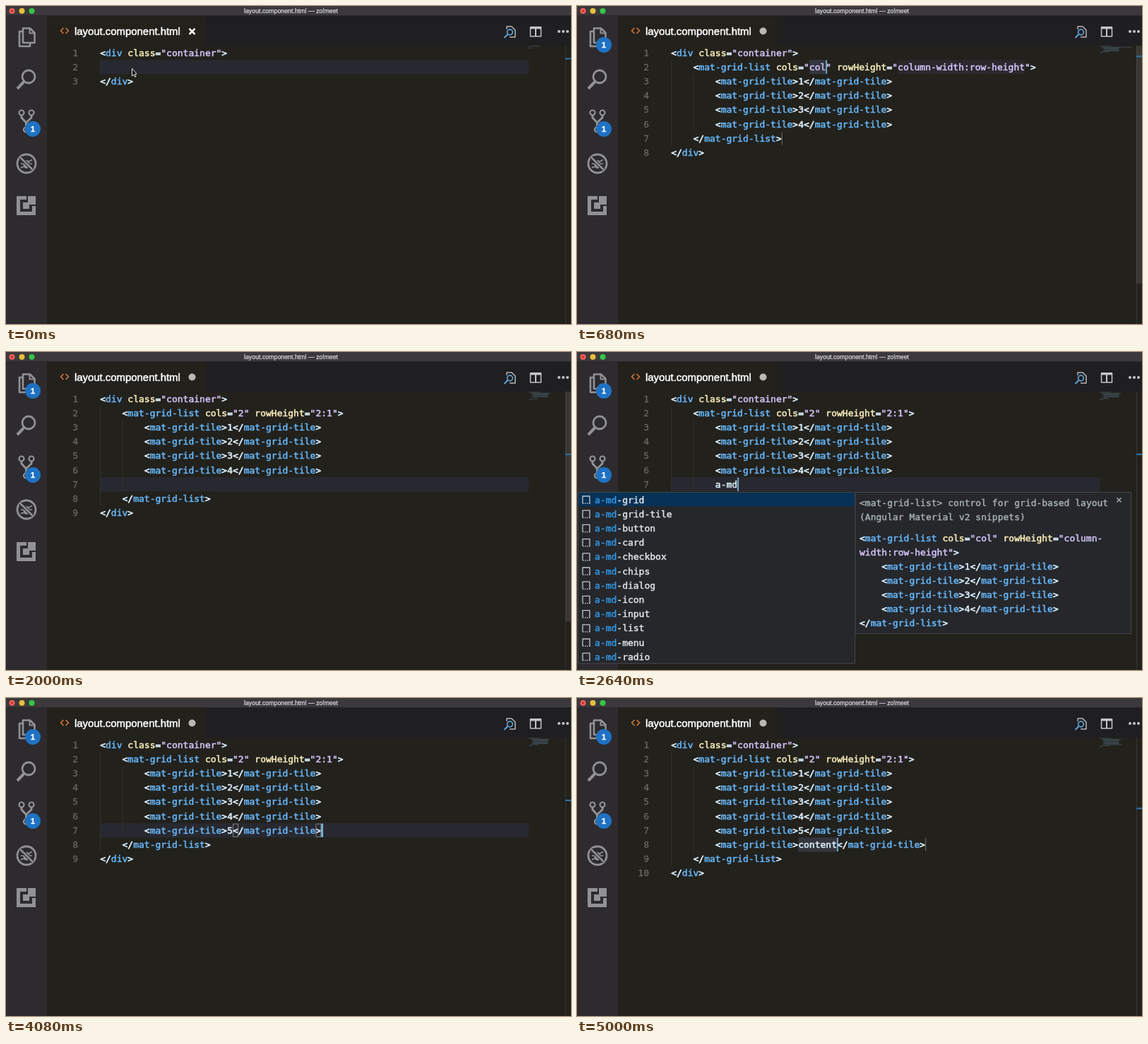
An HTML page with a canvas for the animation above (5040 ms loop, 800 by 450 pixels).

```html
<!DOCTYPE html>
<html lang="en">
<head>
<meta charset="utf-8">
<title>Grid snippet</title>
<style>
html, body { margin: 0; width: 100%; height: 100%; overflow: hidden; background: #22211c; }
canvas { display: block; width: 800px; height: 450px; }
</style>
</head>
<body>
<canvas id="stage" width="800" height="450"></canvas>
<script>
const ctx = document.getElementById('stage').getContext('2d');
const LOOP = 5040, LEFT = 133.2, TOP = 56, ROW = 20.2, CHAR = 7.826;
const MONO = '13px "DejaVu Sans Mono", monospace';
const SANS = '"Liberation Sans", Arial, sans-serif';
const ICON = '#929194', SIDE = '#2d2b2e';
const color = { tag: '#66b4f5', attr: '#f3e7b5', string: '#cfbff3', plain: '#dceefb' };

const OPEN = '<div class="container">', CLOSE = '</div>';
const LIST_END = '    </mat-grid-list>';
const tile = text => `        <mat-grid-tile>${text}</mat-grid-tile>`;
const tiles = [1, 2, 3, 4].map(tile);
const list = (cols, height) => `    <mat-grid-list cols="${cols}" rowHeight="${height}">`;
const QUERY = 'a-md-grid';
const PAUSED_KEYS = [2160, 2360, 2480, 2640, 2840, 2960, 3040, 3120, 3200];
const snippets = ['grid', 'grid-tile', 'button', 'card', 'checkbox', 'chips', 'dialog',
  'icon', 'input', 'list', 'menu', 'radio'].map(name => 'a-md-' + name);

const typed = (t, start, step) =>
  t < start ? '' : QUERY.slice(0, 1 + Math.floor((t - start) / step));
const x = col => LEFT + col * CHAR;
const y = row => TOP + (row - 1) * ROW;

function rect(left, top, w, h, fill) {
  ctx.fillStyle = fill;
  ctx.fillRect(left, top, w, h);
}

function path(points, stroke, width = 2, closed = false) {
  ctx.beginPath();
  points.forEach(([px, py]) => ctx.lineTo(px, py));
  if (closed) ctx.closePath();
  ctx.strokeStyle = stroke;
  ctx.lineWidth = width;
  ctx.stroke();
}

function circle(cx, cy, r, fill, stroke, width = 2) {
  ctx.beginPath();
  ctx.arc(cx, cy, r, 0, Math.PI * 2);
  if (fill) { ctx.fillStyle = fill; ctx.fill(); }
  if (stroke) { ctx.strokeStyle = stroke; ctx.lineWidth = width; ctx.stroke(); }
}

function label(text, px, py, fill, font, align = 'left', weight = 0.25) {
  ctx.font = font;
  ctx.textAlign = align;
  ctx.fillStyle = ctx.strokeStyle = fill;
  ctx.lineWidth = weight;
  ctx.fillText(text, px, py);
  ctx.strokeText(text, px, py);
}

const mono = (text, px, center, fill, align, weight = 0.3) =>
  label(text, px, center + 4.6, fill, MONO, align, weight);

// Highlights markup; strings may continue over a line break.
function code(text, left, center, pitch) {
  let col = 0, row = 0, previous = '';
  for (const match of text.matchAll(/"[^"]*"|<\/?|[\w-]+|\s|[^\w\s]/g)) {
    const token = match[0];
    let kind = 'plain';
    if (token[0] === '"') kind = 'string';
    else if (previous[0] === '<') kind = 'tag';
    else if (text[match.index + token.length] === '=') kind = 'attr';
    token.split('\n').forEach((part, i) => {
      if (i) { row++; col = 0; }
      if (part.trim()) mono(part, left + col * CHAR, center + row * pitch, color[kind], 'left', 0.6);
      col += part.length;
    });
    previous = token;
  }
}

function sceneAt(t) {
  if (t < 600) {
    const query = typed(t, 120, 50);
    return { lines: [OPEN, '    ' + query, CLOSE], row: 2, query, caret: query && 4 + query.length };
  }
  if (t < 1880) {
    const second = t >= 1040;
    const cols = t < 880 ? 'col' : '2';
    const ratio = t < 1200 ? 'column-width:row-height' : '2:1'.slice(0, 1 + Math.floor((t - 1200) / 80));
    const scene = { lines: [OPEN, list(cols, ratio), ...tiles, LIST_END, CLOSE], row: 2 };
    if (t >= 1720) return { ...scene, row: 6, caret: 40 };
    if (t >= 1560) return { ...scene, row: 7, caret: 20 };
    const first = 25, next = first + cols.length + 13;
    scene.end = [7, 20];
    scene.caret = second ? next + ratio.length : first + cols.length;
    if (t < 1200) scene.soft = [2, next, ratio.length];
    if (t < 880) scene.select = [2, first, 3];
    else if (second && t < 1200) scene.select = scene.soft;
    return scene;
  }
  const second = t >= 4240;
  const row = second ? 8 : 7;
  const before = [OPEN, list('2', '2:1'), ...tiles];
  if (second) before.push(tile(5));
  const scene = { row };
  let line = '';
  if (t >= (second ? 4960 : 3640)) {
    const text = !second && t >= 3840 ? '5' : 'content';
    line = tile(text);
    scene.caret = 23 + text.length;
    if (!second && t >= 3960) {
      scene.brackets = [24, 39];
      scene.caret = 40;
    } else scene.end = [row, line.length];
    if (text === 'content') scene.select = [row, 23, 7];
  } else {
    scene.query = second ? typed(t, 4520, 35) : QUERY.slice(0, PAUSED_KEYS.filter(k => t >= k).length);
    scene.pick = t >= (second ? 4880 : 3440) ? 1 : 0;
    line = '        ' + scene.query;
    if (scene.query) scene.caret = line.length;
  }
  scene.lines = [...before, line, LIST_END, CLOSE];
  return scene;
}

function drawBadge(cy) {
  circle(38, cy, 11, '#1f72c3');
  label('1', 38, cy + 4.2, '#fff', 'bold 11.5px ' + SANS, 'center');
}

function drawSidebar(dirty) {
  rect(0, 14, 58, 436, SIDE);
  path([[23, 36], [19, 36], [19, 57], [34, 57], [34, 53]], ICON, 2.6);
  path([[24, 31.5], [34, 31.5], [40.5, 38], [40.5, 52], [24, 52]], ICON, 2.6, true);
  path([[33.5, 32], [33.5, 38.5], [40, 38.5]], ICON);
  if (dirty) drawBadge(55);

  circle(32, 100, 9, null, ICON, 2.8);
  path([[25.5, 107], [16, 117]], ICON, 4);

  path([[22, 154], [22, 158], [28.5, 165], [28.5, 173]], ICON, 3);
  path([[36, 154], [36, 158], [28.5, 165]], ICON, 3);
  for (const [cx, cy] of [[22, 151], [36, 151], [28.5, 175]]) circle(cx, cy, 3.5, SIDE, ICON, 2.2);
  drawBadge(174);

  circle(29, 223, 13, null, ICON, 2.8);
  ctx.beginPath();
  ctx.ellipse(29, 224, 4.5, 6, 0, 0, Math.PI * 2);
  ctx.fillStyle = ICON;
  ctx.fill();
  for (const dy of [-4, 0, 4]) path([[21, 223 + dy * 1.4], [29, 224 + dy / 2], [37, 223 + dy * 1.4]], ICON, 1.7);
  path([[20, 214], [38, 232]], SIDE, 5);
  path([[20, 214], [38, 232]], ICON, 2.5);

  rect(15, 269, 27, 27, ICON);
  rect(20, 274, 17, 17, SIDE);
  rect(24, 278, 9, 9, ICON);
  rect(29, 269, 2, 6, SIDE);
  rect(36, 281, 6, 2, SIDE);
  rect(31, 274, 6, 7, ICON);
}

function drawHeader(dirty) {
  rect(0, 0, 800, 14, '#3b393c');
  rect(0, 13.5, 800, 1, '#1c1b1d');
  ['#fc5b57', '#e5bf3c', '#34c748'].forEach((fill, i) => circle(8.5 + i * 14, 7, 4, fill));
  circle(8.5, 7, 1.1, '#7c1512');
  label('layout.component.html — zolmeet', 403.5, 10.3, '#d8d7d9', '8.8px ' + SANS, 'center', 0.25);

  rect(58, 14.5, 742, 41.5, '#1f1e21');
  rect(58, 14.5, 225, 41.5, '#22211c');
  path([[81.5, 31], [77.5, 35], [81.5, 39]], '#d9773b', 1.6);
  path([[84.5, 31], [88.5, 35], [84.5, 39]], '#d9773b', 1.6);
  label('layout.component.html', 97, 41, '#fff', '14.9px ' + SANS, 'left', 0.5);
  if (dirty) circle(263.5, 35.5, 5, '#b9b8b4');
  else {
    path([[259.5, 32], [267.5, 40]], '#f2f2f0', 2.5);
    path([[267.5, 32], [259.5, 40]], '#f2f2f0', 2.5);
  }

  path([[709, 33], [709, 29], [716, 29], [721, 34], [721, 44], [713, 44]], '#b5b4b7', 1.5);
  circle(713.5, 37, 3.9, '#1f1e21', '#5fa4d4', 1.7);
  path([[710.5, 40], [705.5, 45]], '#5fa4d4', 2);
  ctx.strokeStyle = '#c5c4c7';
  ctx.lineWidth = 1.5;
  ctx.strokeRect(742.5, 30, 15, 13);
  rect(742, 29, 16, 3.5, '#c5c4c7');
  rect(749, 31, 2, 12, '#c5c4c7');
  for (const cx of [783, 789, 795]) circle(cx, 36, 2, '#c5c4c7');
}

function drawMinimap(lines) {
  lines.forEach((line, row) => {
    for (let i = line.search(/\S/); i >= 0 && i < line.length; i++) {
      if (line[i] === ' ') continue;
      ctx.globalAlpha = 0.4 + 0.2 * ((i * 7 + row * 3) % 3);
      rect(740 + i * 0.69, 56.5 + row * 1.3, 0.6, 0.9, '#66869b');
    }
  });
  ctx.globalAlpha = 1;
}

function drawRuler(scene, t) {
  const view = 444, ratio = view / (view + (scene.lines.length - 1) * ROW);
  rect(792, TOP, 1, 394, '#373632');
  const age = Math.min(...[600, 1880, 4240].map(start => t >= start ? t - start : Infinity));
  const alpha = Math.max(0, Math.min(1, (520 - age) / 160));
  if (alpha) rect(792, TOP, 8, view * ratio, `rgba(121,121,121,${0.25 * alpha})`);
  rect(792, TOP + (scene.row - 1) * ROW * ratio - 1, 8, 2, '#2f74aa');
}

function drawEditor(scene) {
  const { lines, row, select, soft, end, brackets, caret } = scene;
  if (!select) rect(LEFT, y(row), 607, ROW, '#282930');
  rect(LEFT, y(2), 1, (lines.length - 2) * ROW, '#34332e');
  if (lines.length > 3) rect(x(4), y(3), 1, (lines.length - 4) * ROW, '#34332e');
  const shade = ([r, col, size], fill) => rect(x(col), y(r), size * CHAR, ROW, fill);
  if (soft) shade(soft, '#2a282c');
  if (select) shade(select, '#34363e');
  lines.forEach((line, i) => {
    const center = y(i + 1) + 10;
    mono(i + 1, 102, center, '#66655e', 'right');
    code(line, LEFT, center, ROW);
  });
  for (const col of brackets || []) {
    ctx.strokeStyle = '#858580';
    ctx.lineWidth = 1;
    ctx.strokeRect(x(col) + 0.5, y(row) + 1, CHAR - 0.8, ROW - 2);
  }
  if (end) rect(x(end[1]), y(end[0]) + 1, 1, ROW - 2, '#706f69');
  if (caret) rect(x(caret), y(row) + 0.5, brackets ? 2.8 : 1.8, ROW - 1, '#79b6da');
}

function snippetInfo(name) {
  const tag = name.replace('a-md-', 'mat-');
  if (name === QUERY) return [
    '<mat-grid-list> control for grid-based layout',
    '<mat-grid-list cols="col" rowHeight="column-\nwidth:row-height">\n' +
      tiles.map(line => line.slice(4)).join('\n') + '\n</mat-grid-list>'
  ];
  return [`<${tag}> control`, `<${tag}>content</${tag}>`];
}

function panel(left, top, w, h) {
  rect(left, top, w, h, '#25272b');
  ctx.strokeStyle = '#44464a';
  ctx.lineWidth = 1;
  ctx.strokeRect(left + 0.5, top + 0.5, w - 1, h - 1);
}

function drawSuggestions({ row, query, pick = 0 }) {
  if (!query) return;
  const top = y(row + 1) + 0.6;
  const matches = snippets.filter(name => name.startsWith(query));
  panel(1, top, 393, matches.length * ROW + 0.8);
  rect(2, top + 1 + pick * ROW, 391, ROW - 1, '#073156');
  matches.forEach((name, i) => {
    const center = top + 11 + i * ROW;
    path([[8, center + 5], [8, center - 5], [18, center - 5], [18, center + 5]], '#c1c6ca', 1.3);
    for (const dx of [8, 11, 14, 17]) rect(dx, center + 4.5, 1.6, 1.4, '#c1c6ca');
    mono(query, 25, center, '#3194df', 'left', 0.5);
    mono(name.slice(query.length), 25 + query.length * CHAR, center, '#dde3e7', 'left', 0.5);
  });

  const [title, body] = snippetInfo(matches[pick]);
  panel(393.5, top, 391.5, 61 + body.split('\n').length * 20);
  mono(title, 400, top + 15.5, '#a6afb5', 'left', 0.45);
  mono('(Angular Material v2 snippets)', 400, top + 35.5, '#a6afb5', 'left', 0.45);
  code(body, 400, top + 65.3, 20);
  path([[764.5, top + 8.5], [770.5, top + 14.5]], '#a7aaad', 1.5);
  path([[770.5, top + 8.5], [764.5, top + 14.5]], '#a7aaad', 1.5);
}

function drawPointer() {
  ctx.beginPath();
  [[178.5, 88.5], [178.5, 99], [181, 97], [182.5, 100.5], [184, 99.8], [182.6, 96.5], [185, 96]]
    .forEach(([px, py]) => ctx.lineTo(px, py));
  ctx.closePath();
  ctx.fillStyle = '#111';
  ctx.strokeStyle = '#e4e4e4';
  ctx.lineWidth = 1;
  ctx.fill();
  ctx.stroke();
}

function draw(t) {
  const scene = sceneAt(t), dirty = t >= 120;
  ctx.lineJoin = 'round';
  rect(0, 0, 800, 450, '#22211c');
  drawHeader(dirty);
  drawSidebar(dirty);
  drawEditor(scene);
  drawMinimap(scene.lines);
  drawRuler(scene, t);
  drawSuggestions(scene);
  if (!dirty) drawPointer();
}

const start = performance.now();
function tick() {
  draw((performance.now() - start) % LOOP);
  requestAnimationFrame(tick);
}
tick();
</script>
</body>
</html>
```
